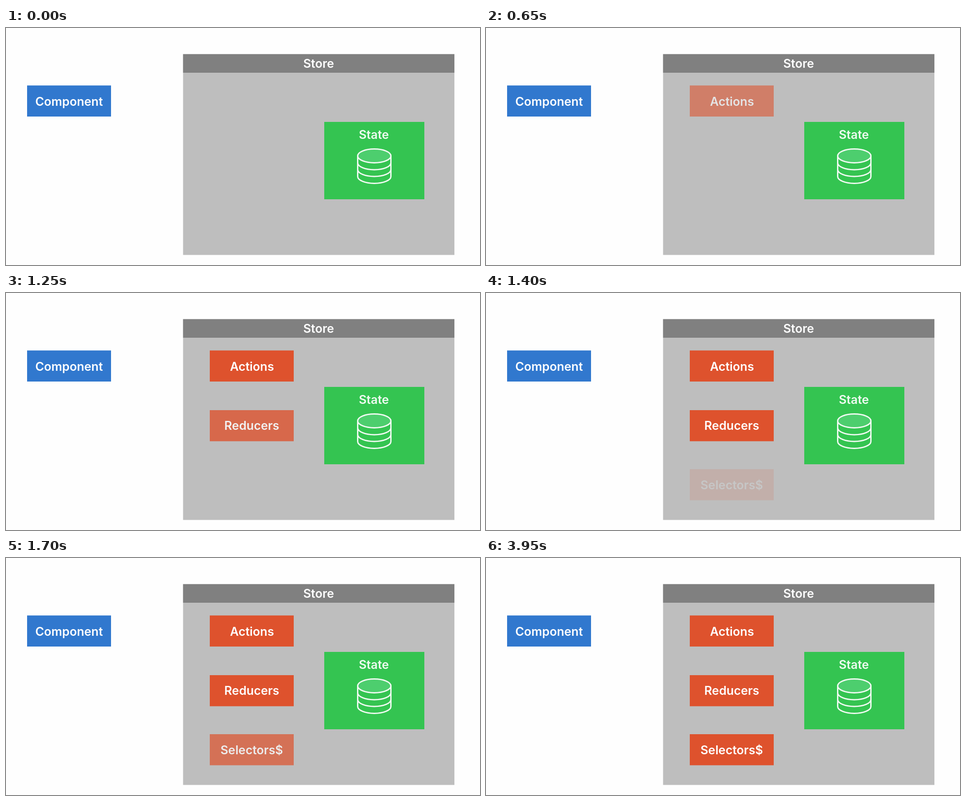
An HTML page that plays this animation: 1056x530 px, repeating every 8000 ms.

```html
<!DOCTYPE html>
<html lang="en">
<head>
<meta charset="utf-8">
<title>Store diagram</title>
<style>
  html, body { margin: 0; width: 100%; height: 100%; overflow: hidden; background: #fefefe; }
  svg { display: block; width: 1056px; height: 530px; }
  text { font: 600 26.7px Inter, sans-serif; fill: #fff; text-anchor: middle; }
  .box { fill: #de522d; }
  .soft { fill: #effaf1; }
  .disk { fill: none; stroke: #effaf1; stroke-width: 3; }
  .fade { animation: 8s step-end infinite; }
  .actions { animation-name: actions; }
  .reducers { animation-name: reducers; }
  .selectors { animation-name: selectors; }

  /* Opacity climbs in 150 ms steps */
  @keyframes actions {
    0% { opacity: 0; }
    6.25% { opacity: .28; }
    8.125% { opacity: .59; }
    10% { opacity: .88; }
    11.875%, 100% { opacity: 1; }
  }
  @keyframes reducers {
    0% { opacity: 0; }
    11.875% { opacity: .2; }
    13.75% { opacity: .49; }
    15.625% { opacity: .79; }
    17.5%, 100% { opacity: 1; }
  }
  @keyframes selectors {
    0% { opacity: 0; }
    17.5% { opacity: .13; }
    19.375% { opacity: .42; }
    21.25% { opacity: .71; }
    23.125% { opacity: .98; }
    25%, 100% { opacity: 1; }
  }
</style>
</head>
<body>
<svg viewBox="0 0 1056 530">
  <rect x="47" y="128.5" width="187" height="69.5" fill="#3178ce"/>
  <text x="140.5" y="173.5">Component</text>

  <rect x="394.5" y="58.5" width="604.5" height="449" fill="#bebebe"/>
  <rect x="394.5" y="58.5" width="604.5" height="41.5" fill="#808080"/>
  <text x="696.5" y="89">Store</text>

  <rect x="709" y="210" width="223" height="173" fill="#34c451"/>
  <text class="soft" x="819.5" y="248">State</text>
  <g class="disk">
    <ellipse cx="820.5" cy="286" rx="37" ry="15.5" fill="#4dce6e"/>
    <path d="M783.5 286V332A37 15.5 0 0 0 857.5 332V286"/>
    <path d="M783.5 301.5a37 15.5 0 0 0 74 0M783.5 316.5a37 15.5 0 0 0 74 0"/>
  </g>

  <g class="fade actions">
    <rect class="box" x="454" y="128.5" width="187" height="69.5"/>
    <text x="548" y="173.5">Actions</text>
  </g>
  <g class="fade reducers">
    <rect class="box" x="454" y="262" width="187" height="69.5"/>
    <text x="547.5" y="306">Reducers</text>
  </g>
  <g class="fade selectors">
    <rect class="box" x="454" y="394" width="187" height="69.5"/>
    <text x="547.5" y="439">Selectors$</text>
  </g>
</svg>
</body>
</html>
```
